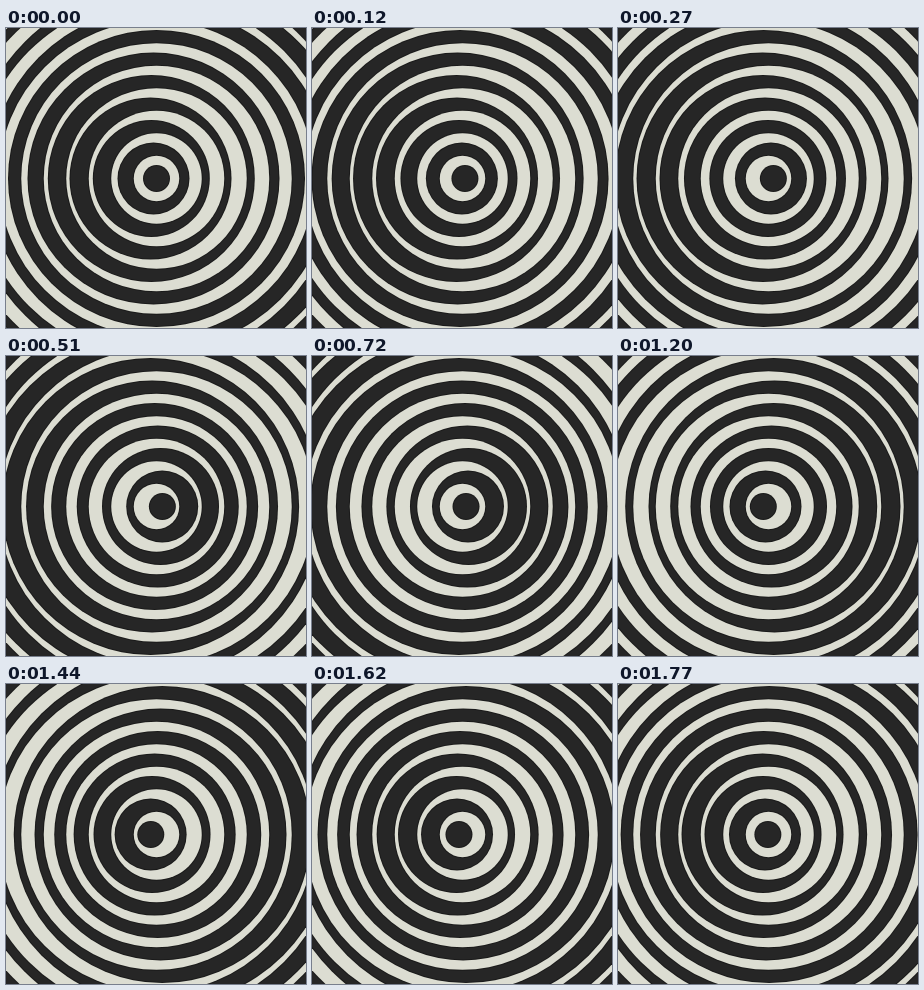
An HTML page for the animation above (1.8 s loop, 300x300 px).

```html
<!DOCTYPE html>
<html lang="en">
<head>
<meta charset="utf-8">
<title>Wobbling rings</title>
<style>
  html, body { margin: 0; width: 100%; height: 100%; overflow: hidden; background: #262626; }
  svg { display: block; width: 300px; height: 300px; }
</style>
</head>
<body>
<svg id="stage" viewBox="0 0 300 300"></svg>
<script>
const LOOP = 1800, STEP = 30;
const CENTER = 150.5, RINGS = 10, PITCH = 22.5, BAND = 9, BLEED = 0.25;
const SWAY = 6, LAG = Math.PI / 6;
const DARK = '#262626', LIGHT = '#dcddd2', EDGE = '#1a1a1a';

const stage = document.getElementById('stage');

function addCircle(r, fill) {
  const c = document.createElementNS('http://www.w3.org/2000/svg', 'circle');
  c.setAttribute('cx', CENTER);
  c.setAttribute('cy', CENTER);
  c.setAttribute('r', r);
  c.setAttribute('fill', fill);
  stage.appendChild(c);
  return c;
}

// Light discs stay put; the dark disc on each one sways, later towards the rim.
// A thin darker edge lies on the dark side of every border.
const discs = [];
for (let k = RINGS; k >= 1; k--) {
  const outer = PITCH * k + BLEED, inner = PITCH * k - BAND;
  addCircle(outer + 1, EDGE);
  addCircle(outer, LIGHT);
  discs.push({
    lag: (k - 1) * LAG,
    parts: [addCircle(inner, EDGE), addCircle(inner - 1, DARK)]
  });
}

function draw(ms) {
  const t = Math.floor((ms % LOOP) / STEP) * STEP;
  const angle = 2 * Math.PI * t / LOOP;
  for (const { lag, parts } of discs) {
    const x = (CENTER + SWAY * Math.sin(angle - lag)).toFixed(3);
    for (const part of parts) part.setAttribute('cx', x);
  }
}

const start = performance.now();
function tick() {
  draw(performance.now() - start);
  requestAnimationFrame(tick);
}
tick();
</script>
</body>
</html>
```
